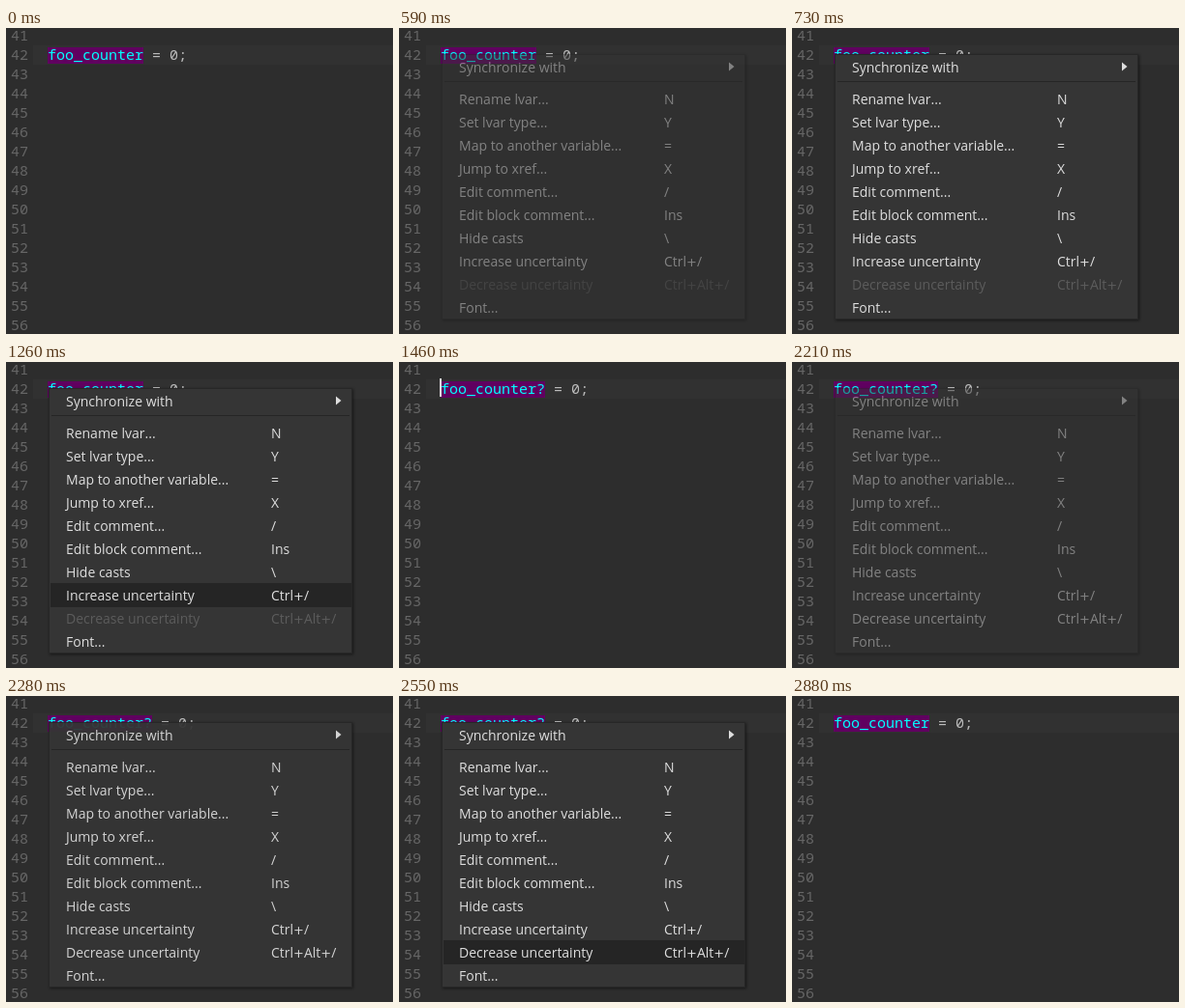
These frames come from a looping animation (400 by 317 pixels, 2.95 s). An HTML page:

```html
<!DOCTYPE html>
<html lang="en">
<head>
<meta charset="utf-8">
<title>Context menu</title>
<style>
html, body { margin: 0; width: 100%; height: 100%; overflow: hidden; background: #2d2d2d; }
svg { display: block; }
text { white-space: pre; }
.code { font: 15px "Noto Sans Mono", monospace; fill: #bdbdbd; }
.num { fill: #666; }
.var { fill: #0ff; }
.plus { font: 13px "DejaVu Sans", sans-serif; }
#menu { font: 14px "Open Sans", sans-serif; fill: #dedede; filter: drop-shadow(1px 1px 1.5px rgba(0, 0, 0, .5)); }
</style>
</head>
<body>
<svg width="400" height="317" viewBox="0 0 400 317">
  <rect width="400" height="317" fill="#2d2d2d"/>
  <rect x="28" y="18" width="372" height="20" fill="#313131"/>
  <g class="code" id="lines"></g>
  <rect id="mark" x="43" y="20" height="17" fill="#600060"/>
  <text class="code" x="43" y="33"><tspan class="var" id="name"></tspan> = 0;</text>
  <rect id="caret" x="42" y="17" width="2" height="19" fill="#ddd"/>
  <g id="menu">
    <rect x="44.5" y="27.5" width="313" height="274" fill="#353535" stroke="#272727"/>
    <rect id="hover" x="46" width="311" height="25" fill="#252525"/>
    <rect x="47" y="55" width="308" height="1" fill="#252525"/>
    <path d="M341 35.5v9l5.5-4.5z"/>
  </g>
</svg>
<script>
const $ = id => document.getElementById(id);
const items = [
  ["Synchronize with"], ["Rename lvar...", "N"], ["Set lvar type...", "Y"],
  ["Map to another variable...", "="], ["Jump to xref...", "X"],
  ["Edit comment...", "/"], ["Edit block comment...", "Ins"],
  ["Hide casts", "\\"], ["Increase uncertainty", "Ctrl+/"],
  ["Decrease uncertainty", "Ctrl+Alt+/"], ["Font..."]
];
const INCREASE = 8, DECREASE = 9, FONT = 10;
const rowY = i => i ? 50 + 24 * i : 41;

function addText(parent, x, y, str) {
  const el = document.createElementNS("http://www.w3.org/2000/svg", "text");
  el.setAttribute("x", x);
  el.setAttribute("y", y);
  el.innerHTML = str.replaceAll("+", '<tspan class="plus">+</tspan>');
  parent.append(el);
  return el;
}

for (let i = 0; i < 16; i++)
  addText($("lines"), 5, 13 + 20 * i, `${41 + i}`).setAttribute("class", "num");

const decrease = [];
items.forEach(([label, key = ""], i) => {
  const cells = [addText($("menu"), 62, rowY(i) + 5, label), addText($("menu"), 274, rowY(i) + 5, key)];
  if (i === DECREASE) decrease.push(...cells);
});

// Value of the last [time, value] step already reached
const at = (t, steps) => steps.reduce((v, [start, next]) => t >= start ? next : v, 0);

const fade = [[590, .48], [660, .94], [730, 1], [1460, 0], [2210, .48], [2280, .94], [2350, 1], [2880, 0]];
const hovered = [[930, FONT], [1060, DECREASE], [1260, INCREASE], [1460, 0], [2480, FONT], [2550, DECREASE], [2880, 0]];
const blink = [[260, 1], [590, 0], [1460, 1], [1990, 0]];

function draw(now) {
  const t = now % 2950;
  const unsure = t >= 1460 && t < 2880;
  const row = at(t, hovered);
  $("name").textContent = unsure ? "foo_counter?" : "foo_counter";
  $("mark").setAttribute("width", unsure ? 108 : 99);
  $("caret").style.opacity = at(t, blink);
  $("menu").style.opacity = at(t, fade);
  $("hover").setAttribute("y", rowY(row) - 13);
  $("hover").style.opacity = row ? 1 : 0;
  for (const cell of decrease) cell.style.fill = unsure ? "" : "#5c5c5c";
  requestAnimationFrame(draw);
}
draw(0);
</script>
</body>
</html>
```
